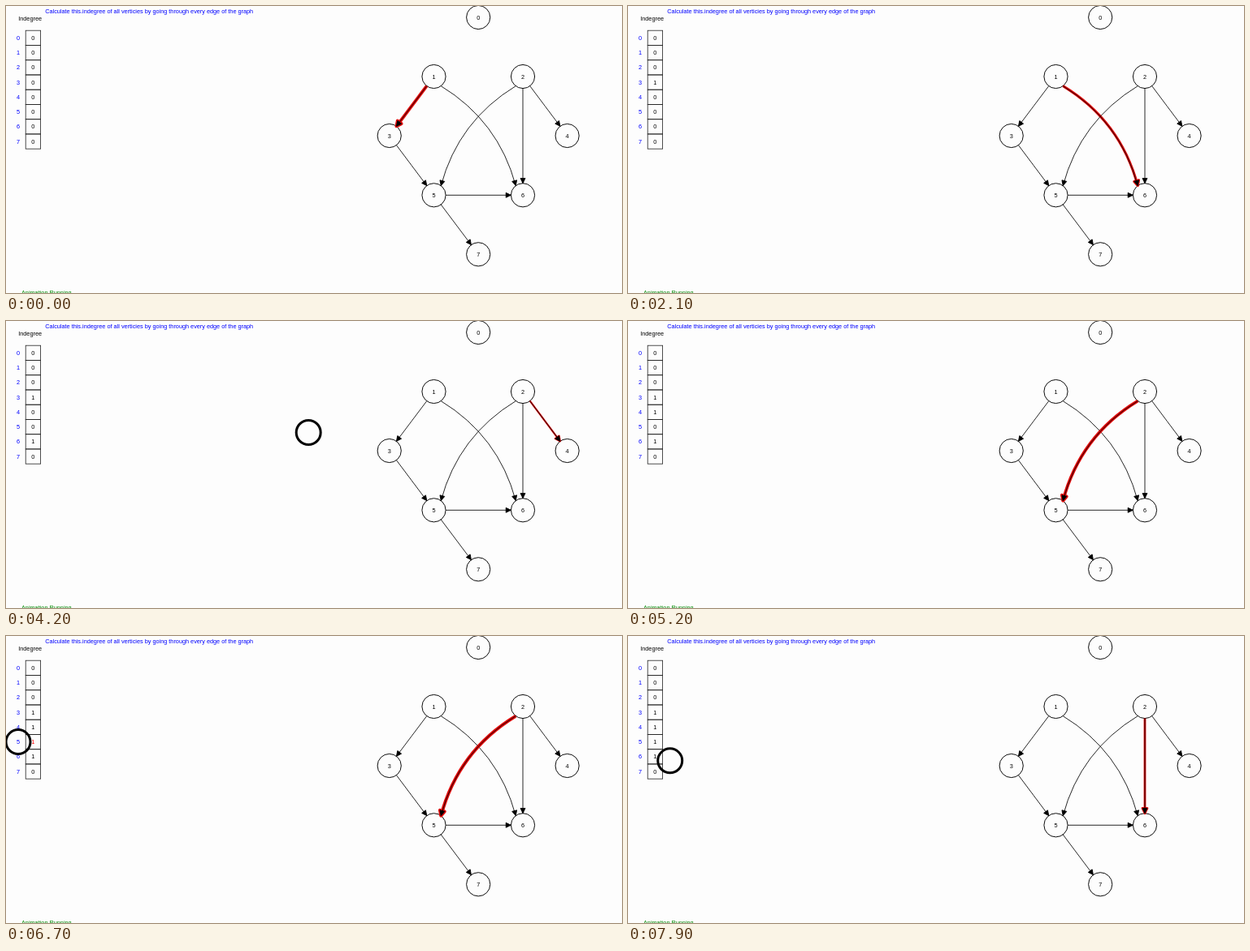
An HTML page with a canvas that plays this animation: 758x354 px, repeating every 8000 ms.

```html
<!DOCTYPE html>
<html lang="en">
<head>
<meta charset="utf-8">
<title>Indegree count</title>
<style>
html, body { margin: 0; width: 100%; height: 100%; overflow: hidden; background: #fdfdfd; }
canvas { display: block; }
</style>
</head>
<body>
<canvas id="stage" width="758" height="354"></canvas>
<script>
const ctx = document.getElementById('stage').getContext('2d');
const LOOP = 8000, STEP = 575, PULSE = 1720;
const R = 14.6, ROW = 18.25, INDEX_X = 15, CELL_X = 24.2, CELL_W = 18.4, TABLE_Y = 30.2;
const BLACK = '#000', BLUE = '#00f', RED = '#e00808';

const nodes = [
  [581.2, 14], [526.5, 87], [636, 87], [471.7, 160],
  [690.6, 160], [526.5, 233.3], [636, 233.3], [581.2, 306.3]
];
// from, to, curvature
const edges = [
  [1, 3, 0], [1, 6, 0.2], [2, 4, 0], [2, 5, -0.2], [2, 6, 0],
  [3, 5, 0], [5, 6, 0], [5, 7, 0]
];
// When the marker leaves the end node of each visited edge
const departures = [484, 2195, 3930, 5645, 7360];

const rowY = i => TABLE_Y + ROW * (i + 0.5);

function text(str, x, y, color = BLACK, align = 'center') {
  ctx.fillStyle = color;
  ctx.textAlign = align;
  ctx.fillText(str, x, y + 2.6);
}

function ring(x, y, r, width) {
  ctx.beginPath();
  ctx.arc(x, y, r, 0, 2 * Math.PI);
  ctx.strokeStyle = BLACK;
  ctx.lineWidth = width;
  ctx.stroke();
}

function drawEdge([from, to, bend], color, width) {
  const [ax, ay] = nodes[from], [bx, by] = nodes[to];
  const len = Math.hypot(bx - ax, by - ay);
  const ux = (bx - ax) / len, uy = (by - ay) / len;
  const x1 = ax + ux * R, y1 = ay + uy * R;
  const x2 = bx - ux * R, y2 = by - uy * R;
  const cx = (x1 + x2) / 2 + (y2 - y1) * bend;
  const cy = (y1 + y2) / 2 - (x2 - x1) * bend;

  ctx.strokeStyle = ctx.fillStyle = color;
  ctx.lineWidth = width;
  ctx.beginPath();
  ctx.moveTo(x1, y1);
  ctx.quadraticCurveTo(cx, cy, x2, y2);
  ctx.stroke();

  ctx.save();
  ctx.translate(x2, y2);
  ctx.rotate(Math.atan2(y2 - cy, x2 - cx));
  ctx.beginPath();
  ctx.moveTo(0, 0);
  ctx.lineTo(-6.2, -3);
  ctx.lineTo(-6.2, 3);
  ctx.closePath();
  ctx.fill();
  ctx.lineJoin = 'round';
  ctx.stroke();
  ctx.restore();
}

function drawTable(counts, redRow) {
  text('Indegree', 29.6, 15.6);
  ctx.strokeStyle = '#222';
  ctx.lineWidth = 0.8;
  counts.forEach((count, i) => {
    ctx.strokeRect(CELL_X, TABLE_Y + i * ROW, CELL_W, ROW);
    text(i, INDEX_X, rowY(i), BLUE);
    text(count, CELL_X + CELL_W / 2, rowY(i), i === redRow ? '#f00' : BLACK);
  });
}

function drawGraph(active, t) {
  nodes.forEach(([x, y], i) => {
    ring(x, y, R, 0.95);
    text(i, x, y);
  });
  // Triangle wave, thinnest at 4200 ms
  const phase = ((t - 4200) / PULSE % 1 + 1) % 1;
  const pulse = 1 - Math.abs(2 * phase - 1);
  edges.forEach((edge, i) => {
    if (i === active) drawEdge(edge, RED, 2.2 + 2 * pulse);
    drawEdge(edge, BLACK, 0.85);
  });
}

function draw(t) {
  ctx.fillStyle = '#fdfdfd';
  ctx.fillRect(0, 0, 758, 354);
  ctx.font = '7.3px "Liberation Sans", Arial, sans-serif';

  const active = departures.filter(d => t >= d - STEP).length - 1;
  const endNode = edges[active][1];
  const progress = (t - departures[active]) / STEP;
  const arrived = progress >= 1;

  const counts = nodes.map(() => 0);
  edges.slice(0, active + arrived).forEach(([, to]) => counts[to]++);

  text('Calculate this.indegree of all verticies by going through every edge of the graph', 48.2, 6, BLUE, 'left');
  text('Animation Running', 19, 353.3, '#080', 'left');
  drawTable(counts, arrived ? endNode : -1);
  drawGraph(active, t);

  if (progress >= 0) {
    const p = Math.min(progress, 1), [x, y] = nodes[endNode];
    ring(x + (INDEX_X - x) * p, y + (rowY(endNode) - y) * p, 15, 3);
  }
}

const start = performance.now();
function frame() {
  draw((performance.now() - start) % LOOP);
  requestAnimationFrame(frame);
}
frame();
</script>
</body>
</html>
```
